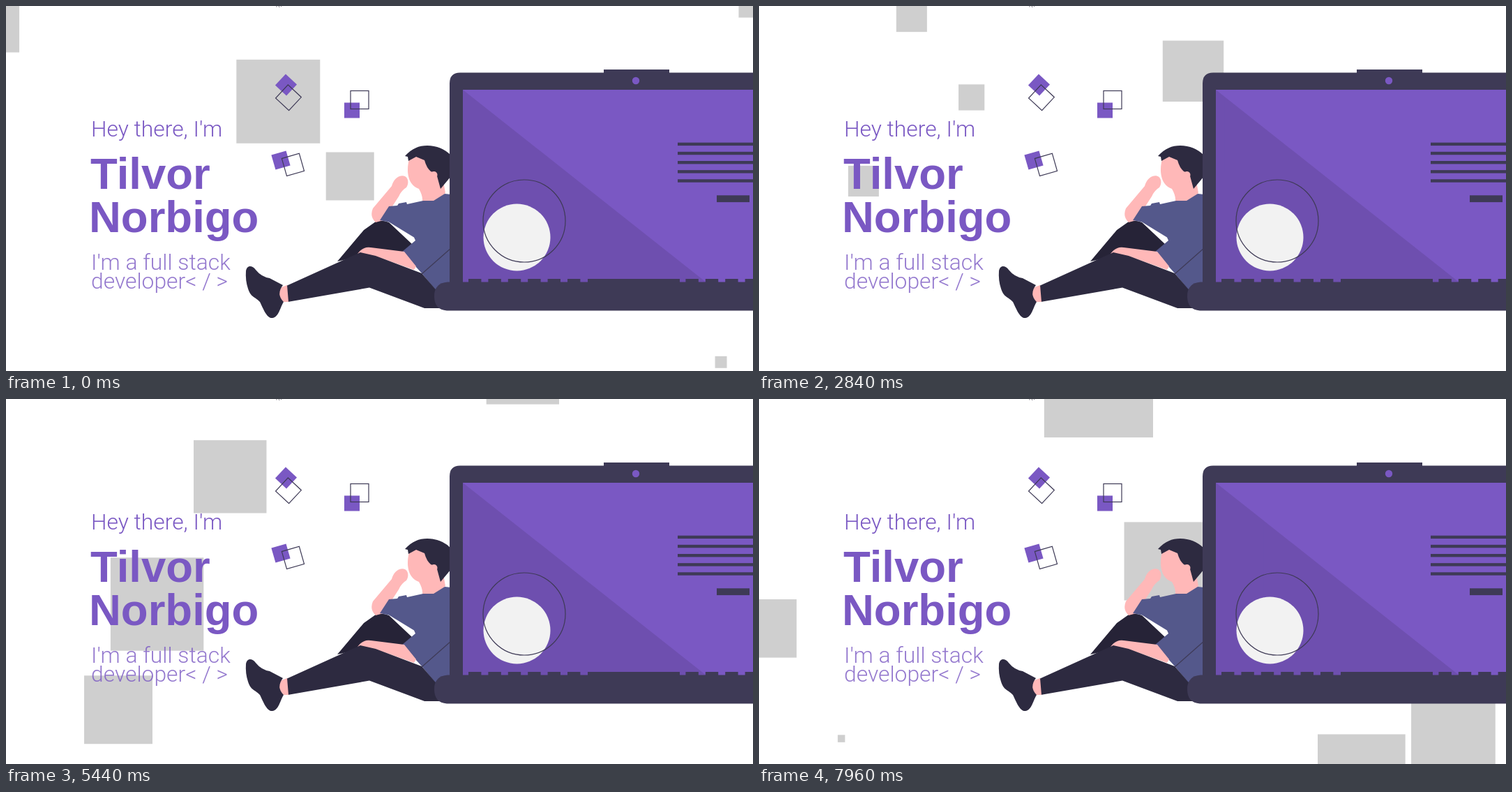
Recreate the animation shown at these times as an HTML page. Size 1071 by 523 pixels, loop 8000 ms.

```html
<!DOCTYPE html>
<html lang="en">
<head>
<meta charset="utf-8">
<title>Developer banner</title>
<style>
  html, body { margin: 0; width: 100%; height: 100%; overflow: hidden; background: #fff; }
  svg { display: block; width: 100%; height: 100%; }
  .light { font: 300 31.8px Roboto, sans-serif; fill: #7a58c3; }
  .soft { opacity: .8; }
  .name { font: 700 63.5px "Liberation Sans", Arial, sans-serif; fill: #7a58c3; }
  .purple { fill: #7a58c3; }
  .frame { fill: #3e3a56; }
  .dark { fill: #2d2a40; }
  .skin { fill: #ffb8b8; }
  .shirt { fill: #54588b; }
  .line { fill: none; stroke: #3e3a56; stroke-width: 1.2; }
</style>
</head>
<body>
<svg viewBox="0 0 1071 523" preserveAspectRatio="none">
  <g id="squares" fill="#000" fill-opacity=".19"></g>

  <path d="M388 0v1.5M391 0l1 2M394 0l1 1" stroke="#77757f" fill="none"/>

  <text class="light" x="122" y="187">Hey there, I'm</text>
  <text class="name" x="121" y="262">Tilvor</text>
  <text class="name" x="119" y="324">Norbigo</text>
  <text class="light soft" x="122" y="378">I'm a full stack</text>
  <text class="light soft" x="122" y="405">developer&lt; / &gt;</text>

  <defs>
    <g id="pair">
      <rect class="purple" x="-11" y="-11" width="22" height="22"/>
      <rect class="line" x="-2" y="-28" width="26" height="26"/>
    </g>
  </defs>
  <use href="#pair" transform="translate(496 149.5)"/>
  <use href="#pair" transform="translate(401.5 113) rotate(133)"/>
  <use href="#pair" transform="translate(394 221) rotate(74)"/>

  <g id="person">
    <path fill="#262337" d="M475 366L513 321 530 309Q538 306 549 310L582 341 568 354 510 358Z"/>
    <path class="skin" d="M580 213C573 232 574 256 592 262Q598 272 597 281L612 283 630 268 620 212Z"/>
    <path class="dark" d="M572 215C582 204 592 200 604 200Q624 200 638 214V244L623 262 617 240 609 237Q603 232 600 221L588 216 577 222 576 216Z"/>
    <circle class="skin" cx="613.5" cy="242" r="5"/>
    <path class="skin" d="M553 258C556 246 566 241 572 244C578 247 577 256 574 260Q567 264 563 273L541 307 530 310Q521 302 526 290Z"/>
    <path class="shirt" d="M638 270L629 269 613 279 598 279 575 284 574 281 563 283 561 286 549 287 536 307 549 309.5 585 331.5 587 336 568 352 597 384 620 412H638Z"/>
    <path class="skin" d="M504 355Q512 344 523 346L571 352 588 373 585 378 540 362Z"/>
    <path class="dark" d="M402 401L508 353 530 358 596 383 621 412V433H600L521 403.5 404 424Z"/>
    <path class="skin" d="M403 400L392 404Q387 415 393 424L405 424Z"/>
    <path class="dark" d="M344 380C345 371 353 371 358 378Q366 388 378 390L397 400Q387 413 398 424C393 432 391 446 382 447C374 448 369 434 364 424C358 417 351 418 347 405Q343 393 344 380Z"/>
    <path class="line" d="M596 384L638 347"/>
  </g>

  <g id="laptop">
    <path class="frame" d="M636 420V111Q636 95.5 651 95.5H857V91H951V95.5H1071V420Z"/>
    <path class="purple" d="M655 120H1071V396H655Z"/>
    <path fill-opacity=".1" d="M655 120L1004 396H655Z"/>
    <circle class="purple" cx="903" cy="107" r="5.2"/>
    <circle fill="#f2f2f2" cx="732.5" cy="331.5" r="48"/>
    <circle class="line" cx="743" cy="308" r="59"/>
    <g id="bars" class="frame"></g>
    <path class="frame" d="M1071 395.5H633Q614 397 614 416Q614 435 632 436.5H1071Z"/>
  </g>
</svg>
<script>
const SECONDS = 8, STEP = 0.04, MAX = 159.6, FIELD = 550;

function setRect(r, x, y, width, height) {
  for (const [k, v] of Object.entries({ x, y, width, height })) r.setAttribute(k, v);
}

function addRect(parent, ...box) {
  const r = document.createElementNS("http://www.w3.org/2000/svg", "rect");
  setRect(r, ...box);
  document.getElementById(parent).append(r);
  return r;
}

// text lines and button on the screen, then the keys along the hinge
for (let i = 0; i < 5; i++) addRect("bars", 963, 195.7 + i * 13.15, 108, 4.4);
addRect("bars", 1019, 271.3, 47, 9.8);
for (let x = 663; x < 1071; x += 28.4) {
  if (x < 820 || x > 970) addRect("bars", x < 820 ? x : x - 1, 391, 18.4, 6);
}
addRect("bars", 834, 391, 132, 6);

const mix = (a, b, k) => a + (b - a) * k;

// size runs up and down between 0 and MAX
function bounce(u) {
  const m = Math.abs(u) % (2 * MAX);
  return Math.min(m, 2 * MAX - m);
}

// a square drifting steadily from one point to another during the loop
function drift(from, to, grow, wraps = false) {
  const el = addRect("squares", 0, 0, 0, 0);
  const pose = t => {
    const k = t / SECONDS;
    return { x: mix(from[0], to[0], k), y: mix(from[1], to[1], k), s: bounce(mix(...grow, k)) };
  };

  // once above the field it comes back from below, a little to the right
  let exit = Infinity, r = 0;
  for (let t = 0; wraps && t < SECONDS && exit > t; t += STEP) {
    const { y, s } = pose(t);
    if (y + s / 2 < 0) { exit = t; r = s / 2; }
  }

  return t => {
    let { x, y, s } = pose(t);
    if (t >= exit) { x += 86 + r; y += FIELD + 2 * r; }
    setRect(el, x - 0.439 * s, y - 0.66 * s, s, s);
  };
}

const squares = [
  drift([383, 156], [-87, -221], [120, 557], true),
  drift([489, 255], [850, -161], [69, 121], true),
  drift([-36, 400], [480, 0], [-22, 164]),
  drift([405, -58], [116, 491], [-125, 332]),
  drift([1292, 39], [854, 566], [-303, 196]),
  drift([1024, 513], [1031, 166], [17, 235]),
  drift([1130, 131], [570, 251], [-47, 113]),
  drift([-23, 41], [112, -172], [75, 75]),
  drift([1068, 3], [1132, -109], [40, 40])
];

const start = performance.now();
function tick() {
  const t = (performance.now() - start) / 1000 % SECONDS;
  const held = Math.floor(t / STEP) * STEP;
  for (const move of squares) move(held);
  requestAnimationFrame(tick);
}
tick();
</script>
</body>
</html>
```
